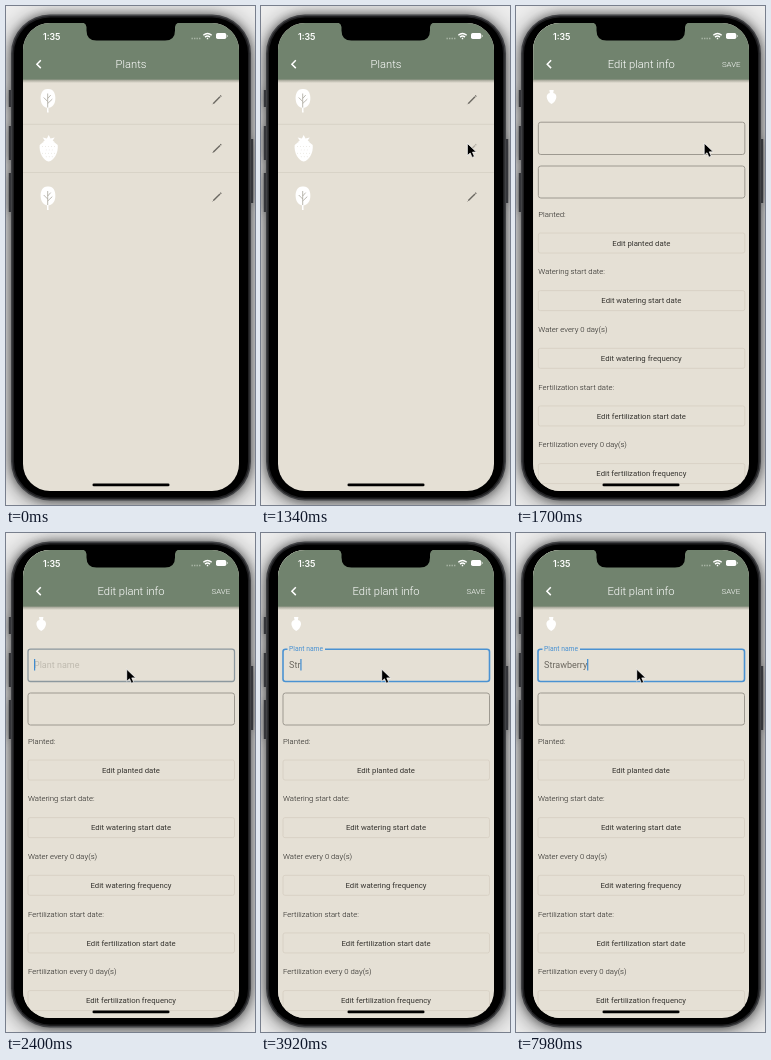
Recreate the animation shown at these times as an HTML page. Size 249 px wide and 499 px high, loop 8 s.

```html
<!DOCTYPE html>
<html lang="en">
<head>
<meta charset="utf-8">
<title>Plants</title>
<style>
html, body { margin: 0; width: 100%; height: 100%; overflow: hidden; background: #eee; }
svg { display: block; width: 100vw; height: 100vh; }
text { font: 300 7.75px Roboto, sans-serif; fill: #1f1e1c; }
.title { font-size: 11.2px; fill: #fff; text-anchor: middle; }
.action { font-weight: 400; fill: #35332f; text-anchor: middle; }
.save { font-size: 7.9px; fill: #fff; }
.clock { font: 600 8.8px Inter, sans-serif; fill: #fff; }
.input { font-size: 9px; font-weight: 400; fill: #6b675f; }
.line { fill: none; stroke: #9d9990; }
#phone { filter: drop-shadow(0 0 4px rgba(0, 0, 0, .45)) drop-shadow(0 3px 11px rgba(0, 0, 0, .5)); }
</style>
</head>
<body>
<svg viewBox="0 0 249 499">
  <defs>
    <clipPath id="screen"><rect x="17" y="17" width="216" height="468" rx="27"/></clipPath>
    <linearGradient id="shade" x2="0" y2="1">
      <stop stop-color="#4c5544" stop-opacity=".55"/><stop offset="1" stop-color="#4c5544" stop-opacity="0"/>
    </linearGradient>
    <linearGradient id="edge">
      <stop stop-opacity=".04"/><stop offset="1" stop-opacity=".2"/>
    </linearGradient>
    <g id="base">
      <rect x="17" y="17" width="216" height="468" fill="#e5e0d5"/>
      <rect x="17" y="73" width="216" height="4" fill="url(#shade)"/>
      <rect x="17" y="17" width="216" height="56.5" fill="#71836e"/>
      <path d="M34.8 54.3l-3.9 3.9 3.9 3.9" fill="none" stroke="#fff" stroke-width="1.5"/>
    </g>
    <g id="tree">
      <path d="M0-11.5C5-12 8-7 7.3-1 7 4 4 7.3 0 7.5-4 7.3-7 4-7.3-1-8-7-5-12 0-11.5z" fill="#fff"/>
      <path d="M-.3 10.5V-7M-.3 3l4.6-4.4M-.3 1l-4-4M-.3-2l3-3.4" fill="none" stroke="#aaa69c" stroke-width=".8"/>
      <path d="M-1 7v5h1.6V7" fill="#fff"/>
    </g>
    <g id="berry" fill="#fff">
      <path d="M-9-3.5Q-6-7 0-5.5 6-7 9-3.5C10 4 5 12.5 0 13-5 12.5-10 4-9-3.5z"/>
      <path d="M0-4.5L-6.5-6-4-8-6-11-1.8-10 0-13.5 1.8-10 6-11 4-8 6.5-6z"/>
      <g id="seeds" fill="#d9d5ca"></g>
    </g>
    <g id="pencil" stroke="#6b6862">
      <path d="M-3.6 3.6L3-3" stroke-width="1.4"/>
      <path d="M-4.4 4.4l1-1" stroke-width=".8"/>
      <path d="M3.4-3.4l.8-.8" stroke-width="1.5"/>
    </g>
  </defs>

  <g id="phone">
    <path d="M4 84v17M4 120v34M4 167v39M246 133v64" stroke="#35363a" stroke-width="2.4"/>
    <rect x="5" y="8.5" width="240" height="486" rx="39" fill="#414245"/>
  </g>
  <rect x="6.5" y="10" width="237" height="483" rx="37.5" fill="#1f1f21"/>
  <rect x="8" y="11.5" width="234" height="480" rx="36"/>

  <g clip-path="url(#screen)">
    <g id="list">
      <use href="#base"/>
      <text class="title" x="125" y="62.4">Plants</text>
      <path d="M17 118.3h216M17 166.5h216" stroke="#d5d0c4" stroke-width=".8"/>
      <use href="#tree" x="42" y="94.5"/>
      <use href="#berry" x="42.7" y="142.5"/>
      <use href="#tree" x="42" y="192"/>
      <use href="#pencil" x="211" y="93.8"/>
      <use href="#pencil" x="211" y="142.5" id="tapped"/>
      <use href="#pencil" x="211" y="191"/>
    </g>
    <g id="edit">
      <rect x="9" y="17" width="8" height="468" fill="url(#edge)"/>
      <use href="#base"/>
      <text class="title" x="125" y="62.4">Edit plant info</text>
      <text class="save" x="205.6" y="61.2">SAVE</text>
      <path d="M33 84h4.400l-.5 3q3.300.8 3.100 4.200-.6 4.600-4.800 6.800-4.200-2.200-4.800-6.800-.2-3.400 3.100-4.200z" fill="#fff"/>
      <rect class="line" id="field" x="22" y="116.2" width="206.5" height="32.3" rx="2.5"/>
      <rect class="line" x="22" y="160" width="206.5" height="32" rx="2.5"/>
      <rect id="gap" x="26.5" y="114" width="37.5" height="4" fill="#e5e0d5"/>
      <text class="input" id="label">Plant name</text>
      <text class="input" id="typed" x="28.1" y="134.8"></text>
      <rect id="caret" y="126" width="1.2" height="11.5" fill="#3f8bd0"/>
      <g id="rows"></g>
    </g>
    <text class="clock" x="37" y="33.6">1:35</text>
    <path d="M185.5 32.5h9" stroke="#a9b5a5" stroke-width="1.3" stroke-dasharray="1.4 1.1"/>
    <g fill="none" stroke="#fff" stroke-width="1.4">
      <path d="M197.3 29.3q4.2-3.8 8.4 0M199 31.1q2.5-2.2 5 0"/>
      <path d="M200.8 32.5h1.4"/>
    </g>
    <rect x="210" y="27" width="10.3" height="6" rx="1.7" fill="#fff"/>
    <path d="M221.3 29v2" stroke="#c5cdc2"/>
    <path d="M76 16.5Q80 17 80.500 21v3.500q0 10 10 10h68.500q10 0 10-10V21q.5-4 4.500-4.500z"/>
    <rect x="86.5" y="477.5" width="77" height="2.7" rx="1.3"/>
  </g>
  <path id="mouse" d="M0 0v12.200l2.800-2.600 1.900 4.400 2.300-.9-1.900-4.400h3.900z" stroke="#fff" stroke-width=".7"/>
</svg>
<script>
const $ = id => document.getElementById(id);
const set = (id, attrs) => { for (const k in attrs) $(id).setAttribute(k, attrs[k]); };
const ramp = (t, a, b) => Math.min(1, Math.max(0, (t - a) / (b - a)));
const smooth = p => p * p * (3 - 2 * p);
const mix = (a, b, p) => a + (b - a) * p;
const blend = (from, to, p) => `rgb(${from.map((v, i) => mix(v, to[i], p))})`;

const blue = [74, 146, 210];
const rows = [
  ['Planted:', 'planted date'],
  ['Watering start date:', 'watering start date'],
  ['Water every 0 day(s)', 'watering frequency'],
  ['Fertilization start date:', 'fertilization start date'],
  ['Fertilization every 0 day(s)', 'fertilization frequency']
];
$('rows').innerHTML = rows.map(([label, action], i) => `<g transform="translate(0 ${i * 57.65})">
  <text x="22" y="210.8">${label}</text>
  <rect x="22" y="227" width="206.5" height="20" rx="2" fill="none" stroke="#d6cfc2" stroke-width=".8"/>
  <text class="action" x="125" y="239.8">Edit ${action}</text></g>`).join('');

let seeds = '';
for (let r = 0; r < 4; r++)
  for (let c = r % 2; c < 5 - r % 2; c++)
    seeds += `<circle cx="${(c - 2) * 3 + (r % 2) * .5}" cy="${r * 3.4 - 2}" r=".45"/>`;
$('seeds').innerHTML = seeds;

const word = 'Strawberry';
const keyTimes = [3260, 3680, 3920, 5160, 5480, 6320, 6560, 6840, 7000, 7180];
// start and end of each caret fade, and its final opacity
const fades = [[2300, 2320, 1], [2620, 2760, 0], [3060, 3200, 1], [4680, 4920, 0],
  [5150, 5160, 1], [6010, 6090, 0], [6310, 6320, 1]];

function draw(t) {
  const enter = 1 - (1 - ramp(t, 280, 1060)) ** 2.5;
  const cross = smooth(ramp(t, 1600, 1940));
  const x = mix(mix(251, 206.4, enter), 120.7, cross);
  const y = mix(mix(294, 137.4, enter), 136.2, cross);
  set('mouse', { transform: `translate(${x} ${y})`, visibility: t < 280 ? 'hidden' : 'visible' });
  set('tapped', { opacity: mix(1, .4, ramp(t, 1140, 1240)) });

  const away = t < 1380 ? 1 : t < 1940 ? Math.exp((1380 - t) / 49.5) : 0;
  set('edit', { transform: `translate(${216 * away})`, visibility: t < 1380 ? 'hidden' : 'visible' });
  set('list', { transform: `translate(${-72 * (1 - away)})` });

  const focus = ramp(t, 2300, 2520);
  const float = smooth(ramp(t, 3260, 3460));
  $('field').style.stroke = blend([157, 153, 144], blue, focus ** 2);
  $('field').style.strokeWidth = mix(1, 1.6, focus);
  set('gap', { opacity: float });
  $('label').style.fill = blend([184, 179, 168], blue, float);
  set('label', {
    opacity: ramp(t, 2300, 2420),
    transform: `translate(28 ${mix(134.8, 118.3, float)}) scale(${mix(1, .75, float)})`
  });

  const text = word.slice(0, keyTimes.filter(k => t >= k).length);
  $('typed').textContent = text;
  const width = text ? $('typed').getComputedTextLength() : 0;
  const alpha = fades.reduce((a, [from, to, end]) => mix(a, end, ramp(t, from, to)), 0);
  set('caret', { x: 28 + width, opacity: alpha });
}

function tick() {
  draw(performance.now() % 8000);
  requestAnimationFrame(tick);
}
tick();
</script>
</body>
</html>
```
